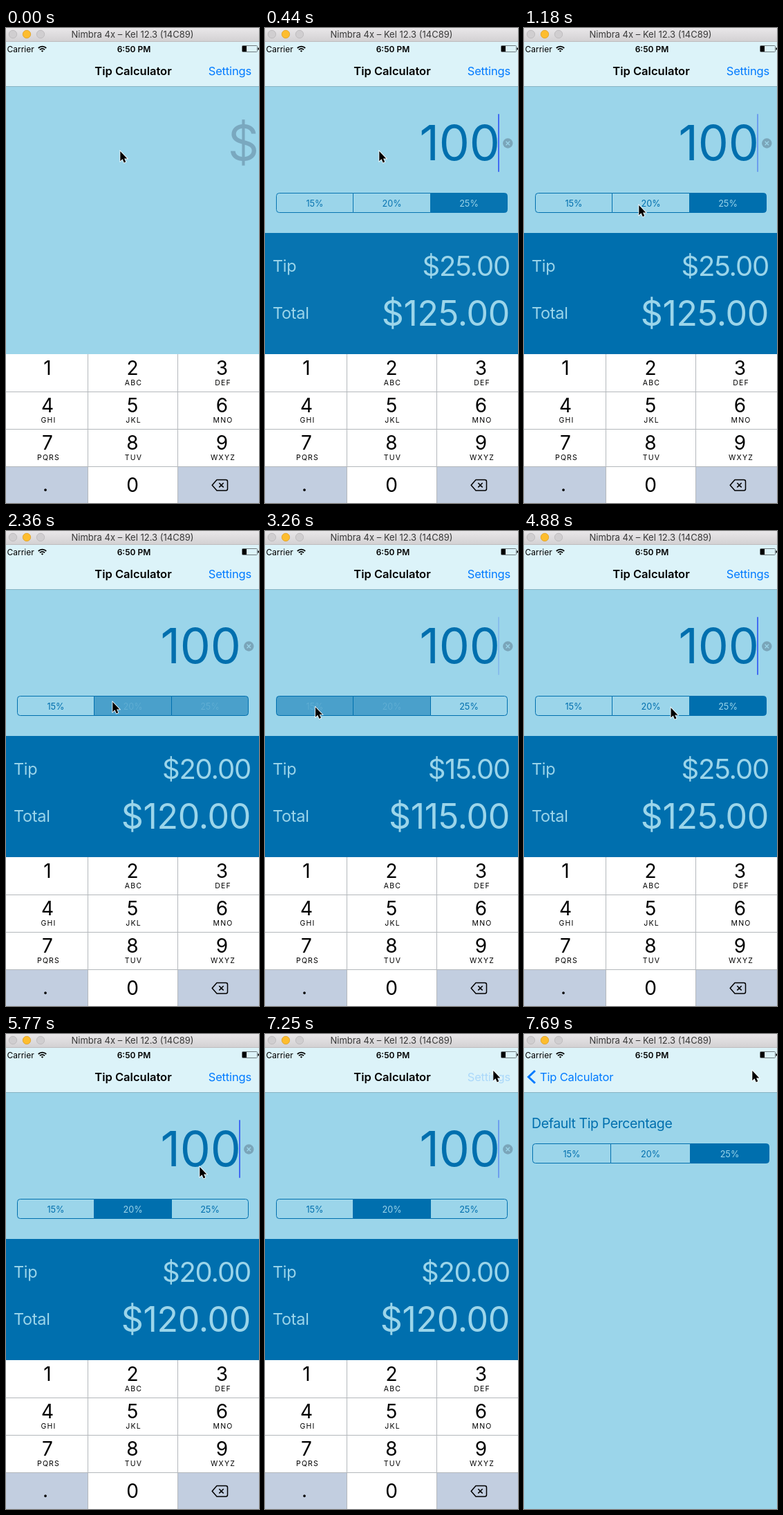
An HTML page for the animation above (7990 ms loop, 366 px wide and 686 px high).

```html
<!DOCTYPE html>
<html lang="en">
<head>
<meta charset="utf-8">
<title>Tip Calculator</title>
<style>
html, body { margin: 0; width: 100%; height: 100%; overflow: hidden; background: #9bd5ea; }
svg { display: block; width: 366px; height: 686px; font-family: Inter, Roboto, "Liberation Sans", sans-serif; }
.mid { text-anchor: middle; }
.end { text-anchor: end; }
.nav { font-size: 16.5px; }
.link { fill: #007aff; letter-spacing: -.01em; }
.big { font-size: 70px; letter-spacing: -.3px; }
.money { fill: #9bd5ea; letter-spacing: -.02em; }
.seg { font-size: 12.7px; text-anchor: middle; }
.key { font-size: 28px; text-anchor: middle; }
.sub { font-size: 10.5px; letter-spacing: 1.2px; text-anchor: middle; }
</style>
</head>
<body>
<svg viewBox="0 0 366 686">
  <defs>
    <linearGradient id="bar" x2="0" y2="1">
      <stop stop-color="#e9e7e9"/><stop offset="1" stop-color="#d2d0d2"/>
    </linearGradient>
  </defs>
  <rect width="366" height="686" fill="#9bd5ea"/>

  <g id="main">
    <text id="bill" class="big end" y="191"></text>
    <g id="clear">
      <circle cx="351.3" cy="166.5" r="7.2" fill="#7aa5b9"/>
      <path d="M348.6 163.8l5.4 5.4m0-5.4l-5.4 5.4" stroke="#9bd5ea" stroke-width="1.3"/>
    </g>
    <rect id="caret" x="337" y="124" width="2" height="84" rx="1" fill="#426bf2"/>
    <g id="result">
      <g id="choice"></g>
      <rect y="296" width="366" height="175" fill="#006fae"/>
      <g class="money">
        <text x="11" y="352" font-size="23.5">Tip</text>
        <text x="11" y="420" font-size="23.5">Total</text>
        <text id="tip" class="end" x="354" y="358" font-size="40" letter-spacing="-.03em"></text>
        <text id="total" class="end" x="354" y="430" font-size="50"></text>
      </g>
    </g>
  </g>

  <g id="settings">
    <rect y="84" width="366" height="602" fill="#9bd5ea"/>
    <text x="11" y="136" font-size="19.5" letter-spacing="-.02em" fill="#006fae">Default Tip Percentage</text>
    <g id="preset"></g>
  </g>

  <g id="keyboard"></g>

  <rect y="20" width="366" height="64" fill="#dcf3f9"/>
  <path d="M0 84.5H366" stroke="#87b4c4"/>
  <text id="title" class="nav mid" y="68" font-weight="600">Tip Calculator</text>
  <text id="open" class="nav link end" x="355" y="68">Settings</text>
  <path id="chevron" d="M16 53L6.5 62 16 71" fill="none" stroke="#007aff" stroke-width="3"/>
  <text id="back" class="nav link" y="68">Tip Calculator</text>

  <g font-size="12">
    <text x="1.5" y="34.5">Carrier</text>
    <text class="mid" x="185" y="34.5" font-weight="600">6:50 PM</text>
  </g>
  <g fill="none" stroke="#000" stroke-width="1.8">
    <path d="M46.8 29a8 8 0 0 1 11.4 0M49 31.4a4.9 4.9 0 0 1 7 0"/>
    <path d="M50.8 33l1.7 1.8 1.7-1.8a2.4 2.4 0 0 0-3.4 0z" fill="#000" stroke="none"/>
  </g>
  <rect x="341.5" y="25.5" width="22" height="9" rx="1" fill="none" stroke="#6f7b7e"/>
  <path d="M342 26h6v8h-6zM364.5 28.500h1.500v3h-1.500z"/>

  <rect width="366" height="20" fill="url(#bar)"/>
  <path d="M0 19.5H366" stroke="#bebcbe"/>
  <g stroke-width=".8">
    <circle cx="10" cy="9" r="5.7" fill="#d0ced0" stroke="#b9b7b9"/>
    <circle cx="30" cy="9" r="5.7" fill="#fdbd2e" stroke="#dfa023"/>
    <circle cx="50" cy="9" r="5.7" fill="#d0ced0" stroke="#b9b7b9"/>
  </g>
  <text class="mid" x="183" y="14" font-size="13" fill="#383838">Nimbra 4x – Kel 12.3 (14C89)</text>

  <path id="mouse" d="M0 0V14.2L3.2 11.3 5.5 16.4 8 15.3 5.8 10.4H10Z" stroke="#fff" stroke-width="1.6" paint-order="stroke"/>
</svg>
<script>
const LOOP = 7990, STEP = 147.9, BLUE = '#006fae', PALE = '#9bd5ea';
const rates = [15, 20, 25];
const $ = id => document.getElementById(id);
const set = (id, attrs) => {
  for (const name in attrs) $(id).setAttribute(name, attrs[name]);
};
const shift = (id, x, y = 0) => set(id, { transform: `translate(${x} ${y})` });
const clamp = v => Math.max(0, Math.min(1, v));

// Pointer stops: step, x, y
const path = [
  [0, 165.3, 178], [7, 165.3, 178], [8, 166.3, 256], [12, 98, 264], [16, 154.3, 247],
  [17, 154.3, 248], [21, 72, 254], [23, 74, 255], [27, 271.3, 258], [30, 292, 256],
  [34, 186, 255], [36, 188, 254], [39, 280.3, 192], [45, 330.3, 53]
];
// Segment taps: step, chosen index
const taps = [[0, 2], [16, 1], [22, 0], [29, 2], [35, 1]];
const reveal = [0, .4, .8, .95];
const slide = { 50: .4, 51: .9, 52: 1 };

// Outlined three-part control; fills holds each part's opacity
function segments(y, edges, fills) {
  const [left, a, b, right] = edges;
  const leftCap = `M${a} ${y}H${left + 4}q-4 0-4 4v20q0 4 4 4H${a}`;
  const rightCap = `M${b} ${y}H${right - 4}q4 0 4 4v20q0 4-4 4H${b}`;
  const middle = `M${a} ${y}H${b}v28H${a}z`;
  const shapes = [leftCap, middle, rightCap];
  const parts = rates.map((rate, i) => {
    const x = (edges[i] + edges[i + 1]) / 2;
    const label = (color, alpha) =>
      `<text class="seg" x="${x}" y="${y + 19}" fill="${color}" opacity="${alpha}">${rate}%</text>`;
    return `<path d="${shapes[i]}" fill="${BLUE}" opacity="${fills[i]}"/>` +
      label(BLUE, 1 - fills[i]) + label(PALE, fills[i]);
  });
  return parts.join('') + `<path d="${leftCap + middle + rightCap}" fill="none" stroke="${BLUE}"/>`;
}

function buildKeyboard() {
  const cols = [60, 183, 312.5];
  const letters = ['', 'ABC', 'DEF', 'GHI', 'JKL', 'MNO', 'PQRS', 'TUV', 'WXYZ'];
  let out = '<path d="M0 471H366V686H0z" fill="#fff"/><path d="M0 634H118V686H0zM249 634H366V686H249z" fill="#c2cee0"/>' +
    '<path d="M0 525.5H366M0 579.5H366M0 633.5H366M118.5 471V686M248.5 471V686" stroke="#b4b8bc"/>';
  letters.forEach((word, i) => {
    const x = cols[i % 3], y = 501 + 54 * Math.floor(i / 3);
    out += `<text class="key" x="${x}" y="${y}">${i + 1}</text><text class="sub" x="${x + 1.5}" y="${y + 15}">${word}</text>`;
  });
  out += '<text class="key" x="57" y="669">.</text><text class="key" x="183" y="670">0</text>' +
    '<path d="M305 652.5h13q2.5 0 2.5 2.5v10.5q0 2.5-2.5 2.5h-13l-6.8-7.7zM308.3 657l6.4 6.4m0-6.4l-6.4 6.4" fill="none" stroke="#000" stroke-width="1.5" stroke-linejoin="round"/>';
  $('keyboard').innerHTML = out;
}

function pointer(k) {
  const i = path.findIndex(p => p[0] >= k);
  if (i < 0) return path.at(-1).slice(1);
  if (!i) return path[0].slice(1);
  const [k0, x0, y0] = path[i - 1], [k1, x1, y1] = path[i], u = (k - k0) / (k1 - k0);
  return [x0 + (x1 - x0) * u, y0 + (y1 - y0) * u];
}

function caretAlpha(t) {
  if (t < 140) return 0;
  if (t < 1100) return 1;
  const p = (t - 1180 + 1010) % 1010;
  if (p > 930) return 1 - .45 * (p - 930) / 80;
  if (p < 90) return .55 * (1 - p / 90);
  return clamp((p - 340) / 90);
}

let last = -1;
function draw(time) {
  const k = Math.min(52, Math.floor((time % LOOP + 12) / STEP));
  if (k !== last) render(last = k);
  requestAnimationFrame(draw);
}

function render(k) {
  const typed = '100'.slice(0, k), bill = +typed;
  const n = taps.findLastIndex(tap => tap[0] <= k);
  const chosen = taps[n][1], fills = [0, 0, 0];
  fills[chosen] = 1;
  if (n && taps[n][0] === k) fills[chosen] = fills[taps[n - 1][1]] = .52;

  $('bill').textContent = typed || '$';
  set('bill', { x: typed ? 339.5 : 365.5, fill: typed ? BLUE : '#7aa8bf' });
  set('clear', { opacity: typed ? 1 : 0 });
  set('caret', { opacity: caretAlpha(k * STEP) });
  set('result', { opacity: reveal[k] ?? 1 });
  const tip = bill * rates[chosen] / 100;
  $('tip').textContent = '$' + tip.toFixed(2);
  $('total').textContent = '$' + (bill + tip).toFixed(2);
  $('choice').innerHTML = segments(238.5, [16.5, 127.5, 239.5, 350.5], fills);

  const p = slide[k] ?? 0;
  shift('main', -110 * p);
  shift('keyboard', -366 * p);
  shift('settings', 366 * (1 - p));
  set('title', { x: 184 - 108 * p, opacity: 1 - p });
  set('back', { x: 23 + 105 * (1 - p), opacity: p });
  set('chevron', { opacity: p });
  set('open', { opacity: (k >= 48 ? .22 : 1) * (1 - p) });
  shift('mouse', ...pointer(k));
}

buildKeyboard();
$('preset').innerHTML = segments(158.5, [12.5, 125.5, 240.5, 354.5], [0, 0, 1]);
requestAnimationFrame(draw);
</script>
</body>
</html>
```
